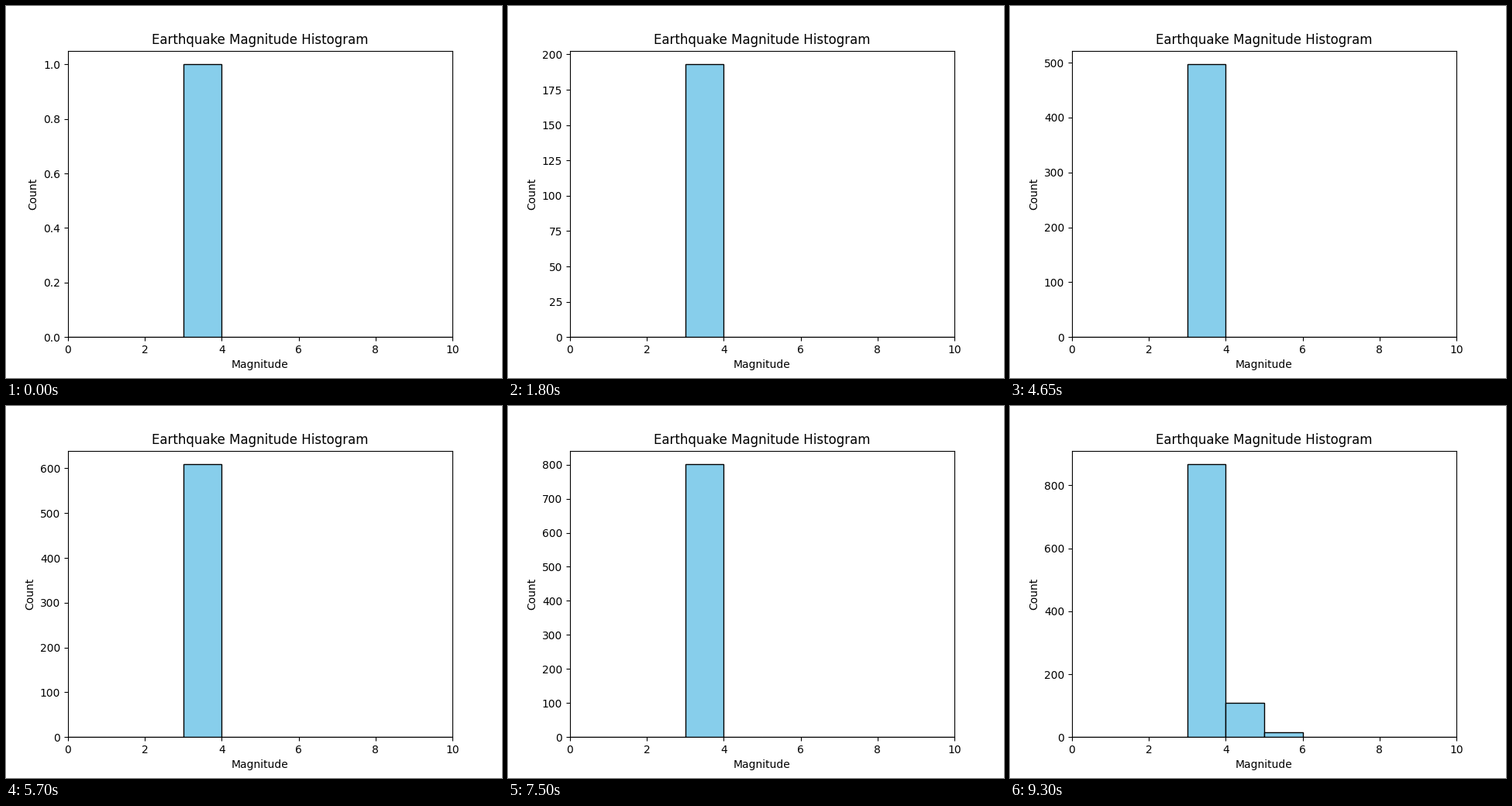
Animation of 640x480 px, one loop 9450 ms. Source, as a matplotlib script:

```python
import numpy as np
import matplotlib.pyplot as plt
from matplotlib.animation import FuncAnimation

FRAMES = 63
STEP = 16  # events added per frame

# Events sorted by magnitude: 3-4, 4-5 and 5-6
magnitudes = np.repeat([3.5, 4.5, 5.5], [867, 110, 16])

fig, ax = plt.subplots(figsize=(6.4, 4.8), dpi=100)


def update(frame):
    ax.clear()
    ax.hist(magnitudes[:frame * STEP + 1], bins=range(11),
            color="skyblue", edgecolor="black")
    ax.set_xlim(0, 10)
    ax.set_title("Earthquake Magnitude Histogram")
    ax.set_xlabel("Magnitude")
    ax.set_ylabel("Count")


anim = FuncAnimation(fig, update, frames=FRAMES, interval=150,
                     repeat=True, repeat_delay=0)
plt.show()
```
